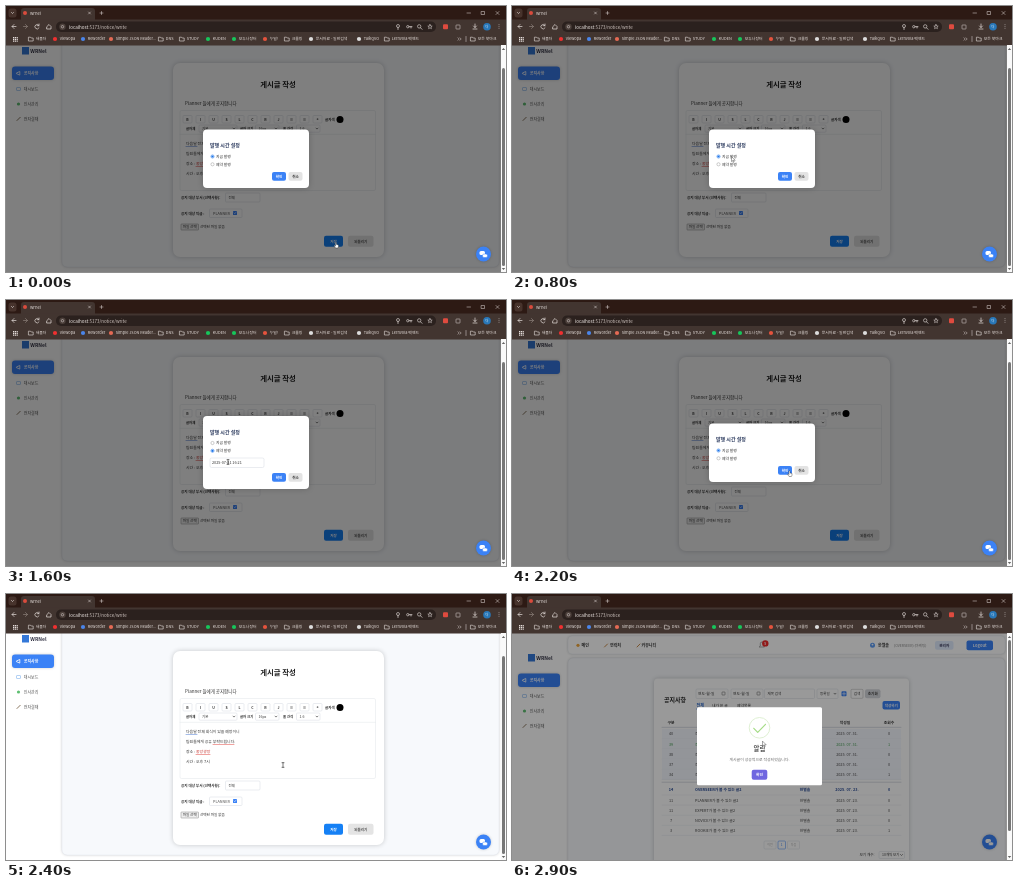
These frames come from a looping animation (500x266 px, 3 s). An HTML page with a canvas:

```html
<!DOCTYPE html>
<html lang="ko">
<head>
<meta charset="utf-8">
<style>
html, body { margin: 0; width: 100%; height: 100%; overflow: hidden; background: #fff; }
canvas { display: block; width: 500px; height: 266px; }
</style>
</head>
<body>
<canvas id="stage"></canvas>
<script>
const canvas = document.getElementById('stage');
const g = canvas.getContext('2d');
const dpr = window.devicePixelRatio || 1;
canvas.width = 500 * dpr;
canvas.height = 266 * dpr;

const BLUE = '#3b82f6', INK = '#333', LINE = '#d5d9e0';
const FONT = '"Noto Sans CJK KR", "Noto Sans CJK", "Noto Sans", sans-serif';

const shift = (x, y, scale = 1) => g.transform(scale, 0, 0, scale, x, y);

function text(s, x, y, size = 4, color = INK, weight = 400, align = 'left') {
  g.font = `${weight} ${size}px ${FONT}`;
  g.fillStyle = color;
  g.textAlign = align;
  g.textBaseline = 'middle';
  g.fillText(s, x, y);
  return g.measureText(s).width;
}
const center = (s, x, y, size, color, weight) => text(s, x, y, size, color, weight, 'center');

function box(x, y, w, h, r, fill, stroke, shadow) {
  g.save();
  g.beginPath();
  g.roundRect(x, y, w, h, r);
  if (shadow) { g.shadowColor = 'rgba(0,0,0,.2)'; g.shadowBlur = shadow * dpr; }
  if (fill) { g.fillStyle = fill; g.fill(); }
  g.shadowColor = 'transparent';
  if (stroke) { g.strokeStyle = stroke; g.lineWidth = .5; g.stroke(); }
  g.restore();
}

function dot(x, y, r, fill, stroke, width = .6) {
  g.beginPath();
  g.arc(x, y, r, 0, 7);
  if (fill) { g.fillStyle = fill; g.fill(); }
  if (stroke) { g.strokeStyle = stroke; g.lineWidth = width; g.stroke(); }
}

function line(d, color, width = .7, x = 0, y = 0) {
  g.save();
  shift(x, y);
  g.strokeStyle = color;
  g.lineWidth = width;
  g.lineCap = g.lineJoin = 'round';
  g.stroke(new Path2D(d));
  g.restore();
}

function button(s, x, y, w, h, fill, color = '#fff', size = 3.6) {
  box(x, y, w, h, 2, fill);
  center(s, x + w / 2, y + h / 2, size, color, 600);
}

function select(s, x, y, w, h, arrow = true) {
  box(x, y, w, h, 1, '#fff', LINE);
  text(s, x + 3, y + h / 2, 3.5);
  if (arrow) line('M-1,-.5L0,.5L1,-.5', INK, .6, x + w - 3, y + h / 2);
}

function browser(path, thumbTop, thumbHeight) {
  const pale = '#e6dfdc';
  box(0, 0, 500, 14, 0, '#2d1a14');
  box(2.5, 2.5, 8, 9, 2.5, '#47332c');
  line('M-1,-.5L0,.5L1,-.5', pale, .7, 6.5, 7);
  box(15, 2, 74, 12, [3, 3, 0, 0], '#423530');
  dot(19, 7, 2, '#d94b3d');
  text('wrnel', 24, 7, 4.2, pale);
  line('M-1,-1L1,1M1,-1L-1,1', pale, .5, 83.5, 7);
  line('M-1.5,0H1.5M0,-1.5V1.5', pale, .5, 95.5, 7);
  line('M461,7h3.5M475.5,5.5h3v3h-3zM490,5.5l3,3m0,-3l-3,3', pale, .5);
  box(0, 13.5, 500, 26, 0, '#423530');
  line('M10,20.5H6l2,-2m-2,2l2,2M41,20.5l2,-2l2,2v2.5h-4z', pale);
  line('M17.5,20.5h4l-2,-2m2,2l-2,2', '#8d817b');
  line('M33,19.5a2.2,2.2 0 1 0 0,2.4M33,18v1.7h-1.7', pale);
  box(50, 15.5, 380, 10.5, 5, '#2b211e');
  dot(56.5, 20.7, 3.2, '#4c403b');
  dot(56.5, 20.7, 1.2, null, pale, .5);
  const hostWidth = text('localhost', 63, 20.8, 4.5, '#f4eeeb');
  text(':5173' + path, 63 + hostWidth, 20.8, 4.5, '#cfc5c0');
  dot(392, 20, 1.5, null, pale);
  line('M392,21.5v2M403,20.7h3M405,20.7v1.3M414.5,21.8l1.5,1.5', pale);
  dot(401.8, 20.7, 1.2, null, pale);
  dot(413.2, 20.4, 1.7, null, pale);
  line('M0,-2.2L.6,-.7L2.2,-.6L1,.4L1.4,2L0,1.1L-1.4,2L-1,.4L-2.2,-.6L-.6,-.7Z', pale, .5, 424, 20.7);
  box(437, 18.3, 5, 5, 1, '#df4b3f');
  box(450, 19, 4, 4, .5, null, pale);
  line('M469,18v3.5m-1.5,-1.5l1.5,1.5l1.5,-1.5M467,23h4', pale);
  dot(481, 20.7, 3.8, '#2877b8');
  center('다', 481, 20.8, 3, '#fff');
  [18.8, 20.7, 22.6].forEach(y => dot(493, y, .45, pale));

  for (let i = 0; i < 9; i++) box(7 + i % 3 * 1.8, 31 + Math.floor(i / 3) * 1.8, 1.2, 1.2, 0, pale);
  const marks = [
    [25, '새폴더'], [49, 'Viewopa', '#f03030'], [77, 'Reworder', '#4a85ea'],
    [105, 'Simple JSON Reader...', '#e56a54'], [155, 'DNS'], [176, 'STUDY'],
    [202, 'KUDEN', '#16c65b'], [228, '모두나장터', '#16c65b'], [259, '누밀!', '#e5533d'],
    [281, '크롤링'], [305, '문서자료 - 일반검색', '#ddd'], [353, 'TalkQVO', '#ddd'],
    [381, 'Lernvola 백엔드'], [467, '모든 북마크']
  ];
  for (const [x, label, color] of marks) {
    if (color) dot(x, 33, 2.1, color);
    else line('M-2.2,-1.8h1.7l.7,.8h2v3h-4.4z', pale, .6, x, 33);
    text(label, x + 4.7, 33, 3.9, pale);
  }
  line('M452,31.8l1.2,1.2l-1.2,1.2M454,31.8l1.2,1.2l-1.2,1.2M460,30.5v5', pale, .5);

  box(495, 39, 5, 227, 0, '#fafafa');
  box(496, thumbTop, 3, thumbHeight, 1.5, '#777');
  g.fillStyle = '#666';
  g.fill(new Path2D('M495.8,44l1.7,-2l1.7,2zM495.8,262l1.7,2l1.7,-2z'));
}

function sidebar(dy) {
  box(16, 41 + dy, 7, 7.5, 0, '#3478d8');
  text('WRNel', 24.3, 45 + dy, 5, '#334', 600);
  box(6, 60.5 + dy, 42, 13.5, 3, BLUE, null, 3);
  const items = [['공지사항', '#fff'], ['대시보드', '#6aa5e8'], ['인사관리', '#5fbf72'], ['전자결재', '#8a7760']];
  items.forEach(([label, color], i) => {
    const y = (i ? 68 + i * 15 : 67.3) + dy;
    if (i == 1) box(10.5, y - 1.5, 4, 3, .5, null, color);
    else if (i == 2) dot(12.5, y, 1.6, color);
    else if (i == 3) line('M11,1.5L14.2,-1.7', color, 1, 0, y);
    else line('M10.8,-.5l3,-1.3v3.6l-3,-1.3z', color, .8, 0, y);
    text(label, 17.7, y, 4, i ? '#555' : '#fff', i ? 400 : 600);
  });
}

function chatButton() {
  box(470, 240.5, 15, 15, 7.5, BLUE, null, 3);
  box(473.5, 245, 5.5, 4, 1.5, '#fff');
  box(476.5, 248, 5, 3.5, 1.5, '#fff', BLUE);
}

function writePage() {
  box(0, 39, 495, 227, 0, '#fff');
  box(56, 30, 437, 231, 5, '#f7f9fc', '#e3e7ee', 3);
  sidebar(0);
  box(167, 57, 211, 194, 7, '#fff', null, 5);
  center('게시글 작성', 272, 78, 7.4, '#222', 700);
  text('Planner 들에게 공지합니다', 179, 97.3, 4.5);
  box(174, 104.5, 195.5, 80, 1.5, '#fff', '#e1e4e8');
  [...'BIUSLCRJ≡≡❝'].forEach((mark, i) => {
    const x = 177 + i * 13;
    box(x, 109.5, 9, 7.5, 1, '#fff', LINE);
    center(mark, x + 4.5, 113.4, 3.5, INK, 600);
  });
  text('글자색', 319, 113.4, 3.5, INK, 600);
  dot(334, 113.5, 3.5, '#000');
  [['글자체', 180, '기본', 193, 38], ['글자 크기', 234, '16px', 249.5, 23.5], ['줄 간격', 277, '1.6', 290.5, 23.5]]
    .forEach(([label, x, value, sx, w]) => {
      text(label, x, 122.7, 3.4, INK, 600);
      select(value, sx, 119, w, 7.2);
    });
  line('M174,128.3H369.5', '#e1e4e8', .5);
  text('다음달 전체 회식이 있을 예정이니', 180, 138, 3.9);
  text('팀원들에게 공유 부탁드립니다.', 180, 148, 3.9);
  const labelWidth = text('장소 : ', 180, 158, 3.9);
  text('중앙광장', 180 + labelWidth, 158, 3.9, '#c8403c');
  text('시간 : 오후 7시', 180, 168, 3.9);
  line('M180,140.5h11', '#4b78d0', .5);
  line('M207,150.5h21M190,160.5h14', '#e0443e', .5);
  text('공지 대상 부서 (선택사항):', 175, 191.3, 3.6, INK, 600);
  select('전체', 219.5, 187, 34.5, 9, false);
  text('공지 대상 직급 :', 175, 207.3, 3.6, INK, 600);
  box(203.5, 203, 32.5, 8.5, 1, '#fff', LINE);
  text('PLANNER', 207, 207.3, 3.8, '#555');
  box(227, 205, 4, 4, .6, BLUE);
  line('M-1,0L-.2,.8L1,-.8', '#fff', .5, 229, 207);
  box(175, 218, 17.5, 6, .5, '#eee', '#888');
  text('파일 선택', 176.7, 221, 3.6);
  text('선택된 파일 없음', 194, 221, 3.6);
  button('저장', 318, 229.7, 19, 11, '#1580f5');
  button('되돌리기', 342, 229.7, 25.5, 11, '#e4e4e4', '#555');
}

function publishModal(reserved) {
  box(0, 39, 495, 227, 0, 'rgba(0,0,0,.5)');
  const top = reserved ? 116 : 123.5, bottom = reserved ? 189 : 182;
  box(197, top, 106, bottom - top, 4, '#fff', null, 6);
  text('발행 시간 설정', 204, top + 16, 5, '#29385c', 700);
  ['지금 발행', '예약 발행'].forEach((label, i) => {
    const y = top + 27 + i * 7.8, on = i == reserved;
    dot(206.5, y, 1.6, '#fff', on ? '#1a73e8' : '#999', .5);
    if (on) dot(206.5, y, 1.1, '#1a73e8');
    text(label, 210, y, 3.8);
  });
  if (reserved) {
    box(204, 158, 54, 9.5, 1.5, '#fff', LINE);
    text('2025-07-31 16:21', 206, 162.8, 3.8);
  }
  button('확인', 266, bottom - 16, 14, 8.8, BLUE);
  button('취소', 282.5, bottom - 16, 14, 8.8, '#e3e3e3', '#444');
}

function topBar() {
  box(56, 42, 437, 18, 4, '#fff', '#e7eaf0', 3);
  dot(66, 51.3, 1.6, '#f0a63a');
  line('M92.5,53l3,-3M125,53l3,-3', '#c78b48', 1);
  text('메인', 69.5, 51.3, 4, INK, 600);
  text('연락처', 98, 51.3, 4, INK, 600);
  text('커뮤니티', 129.5, 51.3, 4, INK, 600);
  line('M247.5,53h5l-.8,-1.3v-2a1.7,1.7 0 0 0 -3.4,0v2z', '#888', .7);
  dot(253.3, 49.4, 3.2, '#ef2929');
  center('5', 253.3, 49.5, 3.5, '#fff', 600);
  dot(360.5, 51.3, 2.5, '#5c9cf5');
  dot(360.5, 50.6, .9, '#fff');
  text('한별솔', 366, 51.3, 4, INK, 600);
  text('(OVERSEER) (마케팅)', 382, 51.3, 3.5, '#888');
  button('관리자', 423, 47, 18.5, 8.7, '#dfeafd', '#335');
  button('Logout', 454.5, 46.5, 26.5, 9.7, BLUE, '#fff', 4);
}

function noticeTable() {
  ['구분', '작성일', '조회수'].forEach((s, i) => center(s, [159, 333, 377][i], 128.3, 3.8, INK, 600));
  const rows = [
    [40, '', 31, 0], [39, '', 31, 1], [38, '', 31, 0], [37, '', 31, 0], [34, '', 31, 1],
    [14, 'OVERSEER가 볼 수 있는 글2', 23, 0], [11, 'PLANNER가 볼 수 있는 글2', 23, 0],
    [11, 'EXPERT가 볼 수 있는 글2', 23, 0], [7, 'NOVICE가 볼 수 있는 글2', 23, 0],
    [3, 'ROOKIE가 볼 수 있는 글2', 23, 1]
  ];
  rows.forEach(([id, title, day, views], i) => {
    const y = 140 + i * 10.1 + (i > 4 ? 5.5 : 0), bold = i == 5 ? 700 : 400;
    const color = i == 5 ? '#284a94' : i == 1 ? '#3e9a4b' : '#444';
    if (i < 5) box(150, y - 5, 239, 10.1, 0, '#f5f8ff');
    line(`M150,${y + 5}H389`, '#dfe3ea', .4);
    center(id, 159, y, 3.8, color, bold);
    text(title || '전체 공지', 183, y, 3.8, color, bold);
    center('한별솔', 293, y, 3.8, color, bold);
    center(`2025. 07. ${day}.`, 335, y, 3.8, color, bold);
    center(views, 377, y, 3.8, color, bold);
  });
  line('M150,133.3H389M150,188.2H389', '#adb6c4', .5);
  box(252, 247, 12, 8, 1, '#fff', LINE);
  box(266, 247, 7.5, 8, 1, '#fff', BLUE);
  box(275.5, 247, 12, 8, 1, '#fff', LINE);
  center('이전', 258, 251, 3, '#aaa');
  center('1', 269.7, 251, 3.4, BLUE);
  center('다음', 281.5, 251, 3, '#aaa');
  text('보기 개수:', 347.5, 261, 3.6);
  select('10개씩 보기', 367, 257.5, 25.5, 7);
}

function noticePage(loaded) {
  box(0, 39, 495, 227, 0, '#fff');
  box(56, 64, 437, loaded ? 220 : 198, 5, '#f7f9fc', '#e3e7ee', 3);
  sidebar(19);
  topBar();
  box(142, 84.5, 255, loaded ? 200 : 53.5, 4, '#fff', null, 4);
  g.save();
  g.globalAlpha = loaded ? 1 : .4;
  text('공지사항', 152, loaded ? 106 : 104, 6, '#222', 700);
  shift(0, loaded ? 0 : -1.5);
  [184, 219].forEach(x => {
    box(x, 95, 32, 9.5, 1, '#fff', LINE);
    text('연도-월-일', x + 2, 99.7, 3.8);
    box(x + 26, 98, 3, 3, .4, null, '#555');
  });
  select('제목 검색', 252.5, 95, 50, 9.5, false);
  select('등록일', 305, 95, 21, 9.5);
  box(329.5, 97.3, 5, 5, .8, BLUE);
  line('M-1.5,0H1.5M0,-1.5V1.5', '#fff', .6, 332, 99.8);
  box(339, 95.3, 12, 9, 1, '#fff', '#aaa');
  center('검색', 345, 99.8, 3.6);
  button('초기화', 353, 95.3, 15.5, 9, '#d3d6db', '#444');
  text('전체', 184.5, 111.3, 4, '#2463c8', 700);
  text('내가 쓴 글', 200, 111.3, 3.8);
  text('예약목록', 225, 111.3, 3.8);
  line('M184.5,115h8', BLUE, .7);
  button('작성하기', 370.5, 107, 17.5, 8.5, BLUE);
  g.restore();
  if (loaded) noticeTable();
  else text('불러오는 중...', 148, 127, 3.9, INK, 600);
}

function track(keys, t) {
  let i = 0;
  while (i < keys.length - 2 && t >= keys[i + 1][0]) i++;
  const [a, b] = [keys[i], keys[i + 1]];
  const p = Math.min(1, Math.max(0, (t - a[0]) / (b[0] - a[0])));
  return a.slice(1).map((v, k) => v + (b[k + 1] - v) * p);
}

function doneAlert(t) {
  box(0, 39, 495, 227, 0, 'rgba(0,0,0,.4)');
  const [scale] = track([[2372, .7], [2507, 1.05], [2612, .95], [2672, 1]], t);
  const [drawn] = track([[2550, 0], [2700, 1]], t);
  g.save();
  shift(247.5, 152.3, scale);
  box(-62.5, -39, 125, 78, 1.5, '#fff');
  dot(0, -18.5, 10.3, null, '#dcefcf', .9);
  if (drawn) {
    g.setLineDash([20 * drawn, 40]);
    line('M-5.7,-18L-1.8,-14L6,-22', '#a5dc86', 1.2);
    g.setLineDash([]);
  }
  center('알림', 0, 2.7, 6.4, '#545454', 700);
  center('게시글이 성공적으로 작성되었습니다.', 0, 13.3, 3.9, '#666');
  button('확인', -7.8, 23.4, 15.6, 10, '#7066e0', '#fff', 3.8);
  g.restore();
}

const pointerPath = [
  [0, 329.5, 236.5], [100, 329.5, 236.5], [700, 219.5, 151], [800, 219.5, 151], [1100, 207, 158],
  [1300, 207, 158], [1500, 222, 162], [1700, 222, 162], [1900, 208, 143], [2000, 208, 143],
  [2200, 277, 171], [2500, 277, 171], [2800, 250.5, 147.5], [3000, 250.5, 147.5]
];

function pointer(t) {
  const [x, y] = track(pointerPath, t);
  const beam = t >= 1500 && t < 1800 || t >= 2300 && t < 2600;
  if (beam) {
    line('M-1,-2.3H1M0,-2.3V2.3M-1,2.3H1', '#222', .6, x, y);
    return;
  }
  const hand = t == 0 || t >= 2100 && t < 2300;
  const shape = hand
    ? 'M0,0q.7,-.6 1,.2v1.7l2,.5v1.8l-.6,1.3h-2.3l-1.6,-2.2l.4,-.5l.9,.6z'
    : 'M0,0v4.5l1.1,-.9l.8,1.8l.8,-.4l-.8,-1.7h1.4z';
  g.save();
  shift(x, y);
  g.fillStyle = '#fff';
  g.fill(new Path2D(shape));
  g.restore();
  line(shape, '#222', .4, x, y);
}

function draw(t) {
  g.setTransform(dpr, 0, 0, dpr, 0, 0);
  g.clearRect(0, 0, 500, 266);
  const writing = t < 2500;
  if (writing) {
    writePage();
    if (t < 2300) publishModal(t >= 1300 && t < 2000 ? 1 : 0);
    chatButton();
  } else {
    noticePage(t >= 2600);
    chatButton();
    doneAlert(t);
  }
  browser(writing ? '/notice/write' : '/notice', writing ? 62 : 46, writing ? 198 : 191);
  pointer(t);
}

const start = performance.now();
function tick() {
  const elapsed = (performance.now() - start) % 3000;
  draw(Math.floor(elapsed / 100) * 100);
  requestAnimationFrame(tick);
}
tick();
</script>
</body>
</html>
```
